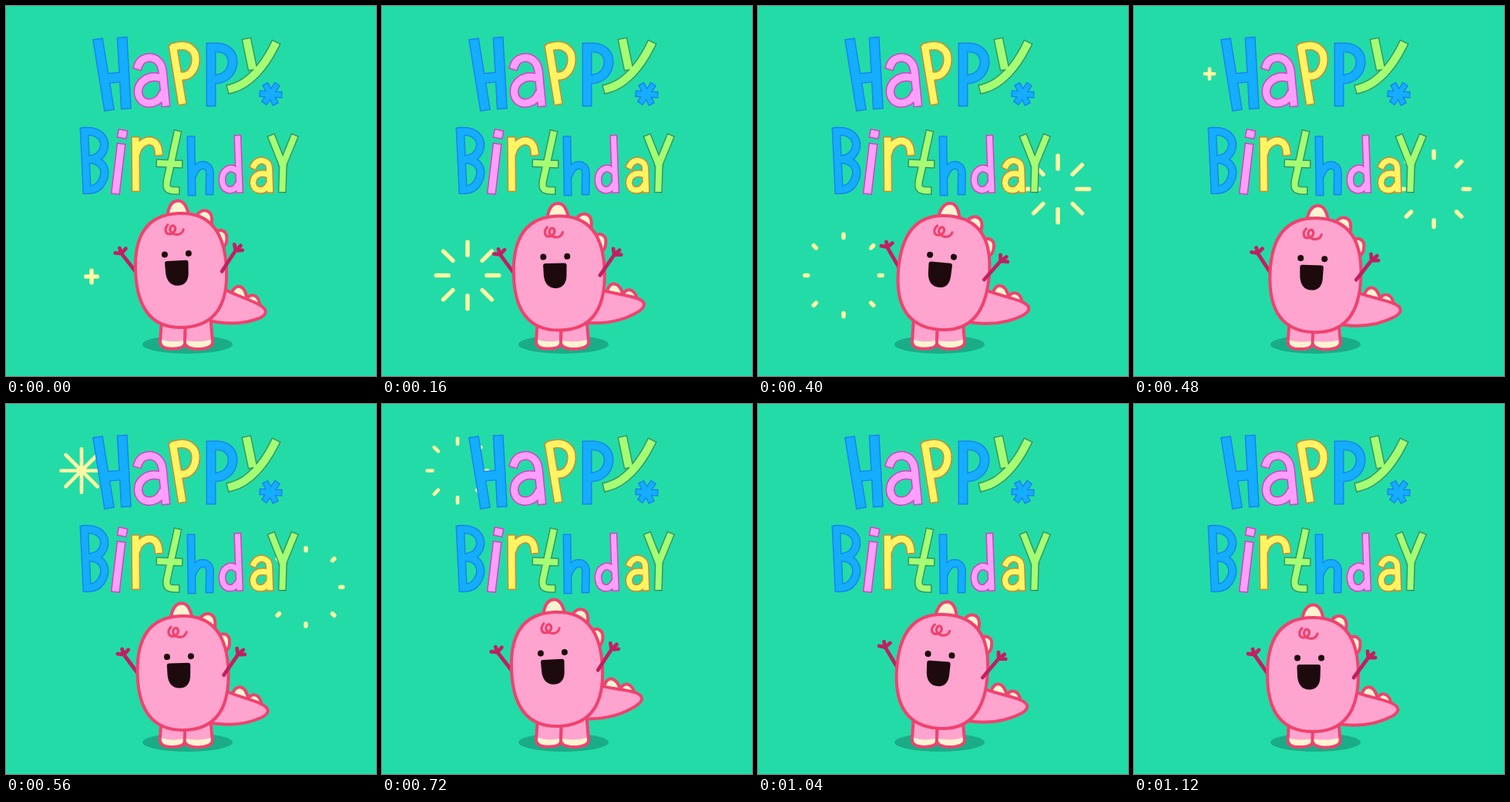
Recreate the animation shown at these times as an HTML page. Size 480x480 px, loop 1200 ms.

```html
<!DOCTYPE html>
<html lang="en">
<head>
<meta charset="utf-8">
<title>Happy Birthday</title>
<style>
html, body { margin: 0; width: 100%; height: 100%; overflow: hidden; background: #23dba7; }
svg { display: block; width: 100vw; height: 100vh; }
.line { fill: none; stroke-linecap: round; stroke-linejoin: round; }
.skin { fill: #ffa3cf; stroke: #f0426e; stroke-width: 4; stroke-linecap: round; stroke-linejoin: round; }
.cream { fill: #fff4d0; stroke: #f0426e; stroke-width: 4; stroke-linejoin: round; }
.sole { fill: #fff4d0; }
.arm { stroke: #c0205f; stroke-width: 4.8; }
.curl { stroke: #f0426e; stroke-width: 3.2; }
.dark { fill: #1c0a0c; }
.spark { stroke: #fdf8a2; }
</style>
</head>
<body>
<svg viewBox="0 0 480 480" role="img" aria-label="Happy Birthday">
  <g id="sparks"></g>
  <g id="letters" fill="none" stroke-linecap="square"></g>
  <ellipse cx="235.5" cy="439" rx="58.5" ry="12" fill="#1aac87"/>
  <g id="tailBase">
    <g id="tail">
      <path class="cream" d="M63 29C65 11 81 12 84 32M83 34C85 22 100 21 102 40"/>
      <path class="skin" d="M42 17C62 28 86 30 102 37C113 42 113 48 103 54C82 65 58 68 32 64"/>
    </g>
  </g>
  <g id="legs">
    <path class="skin" d="M202 405L200 436Q201 444 213 444.500Q231 445 232 438L233 405Z"/>
    <path class="sole" d="M202 433Q215 437 230 434V438Q228 443 213 442.500Q203 442 202 436Z"/>
    <path class="skin" d="M233 405L232 437Q234 445 250 445Q268 444 268 436L265 400Z"/>
    <path class="sole" d="M234 434Q250 437 266 433V436Q266 442 250 443Q236 443 234 437Z"/>
  </g>
  <g id="body">
    <path class="line arm" d="M-57 1L-76 -26M-84 -27L-76 -26L-78 -33M-76 -26L-70 -32"/>
    <path class="cream" d="M-14 -70C-12 -85 -6 -90.500 1 -90.500C8 -90 12 -84 14 -70ZM22 -66C26 -76 35 -79 41 -73C45 -68 44 -60 41 -50ZM49 -48C56 -52 62 -46 61.500 -40C62 -33 59 -28 54 -25Z"/>
    <path class="skin" d="M0 -74C40 -74 59 -49 59 0C59 49 40 74 0 74C-40 74 -59 49 -59 0C-59 -49 -40 -74 0 -74Z"/>
    <path class="line curl" d="M-14 -60C-20 -54 -17 -47 -11 -48C-5 -49 -3 -55 -6 -58C-10 -61 -14 -53 -9 -49C-4 -45 4 -46 6 -53"/>
    <circle class="dark" cx="-20" cy="-21.500" r="4"/>
    <circle class="dark" cx="11" cy="-21.500" r="4"/>
    <path class="dark" d="M-20.500 -10Q-20.500 -13 -17.500 -13L7 -13Q10 -13 10 -10L9.500 4C9 14 4 19.500 -4.500 19.500C-14 19.500 -19 13 -20 3Z"/>
    <path class="line arm" d="M53 4L72 -22M71 -30L72 -22L79 -28M72 -22L81 -22"/>
  </g>
</svg>
<script>
const STEP = 80, FRAMES = 15, SWAY = 7.5;
const el = id => document.getElementById(id);

function path(parent, attrs) {
  const p = document.createElementNS("http://www.w3.org/2000/svg", "path");
  for (const k in attrs) p.setAttribute(k, attrs[k]);
  return parent.appendChild(p);
}

const INK = {
  blue: ["#14adff", "#1785ec"],
  pink: ["#ff9ffc", "#d63fc4"],
  yellow: ["#fff463", "#c98d30"],
  green: ["#a5fd74", "#349860"]
};

// Each letter: ink, pen width, pen strokes.
const LETTERS = [
  ["blue", 13, "M120 49L133 129M151 47L155.500 127M130 94L152 92"],
  ["pink", 11, "M171.500 77C176 63 200 62 203 84L207 125M199 93C184 89 171 99 171.500 112C173 130 195 130 202 116"],
  ["yellow", 11, "M217 55.500L228 122.500M219 53C236 48 247 57 246 71C245 84 237 92 227 91"],
  ["blue", 12, "M266 54V124M268 54C286 52 295 62 294 74C293 88 282 95 270 95"],
  ["green", 12, "M313 48L319 77M348 52C335 78 316 101 293 107"],
  ["blue", 8, "M333 114L354 115M338 104.500L348 124M350 104.500L337 123"],
  ["blue", 10.5, "M101.500 163L105 238M104 162.500C121 162 129 172 127.500 183C125 194 118 198 109 199M109 199C124 200 129 210 127.500 220C124 234 116 238.500 106 238.500"],
  ["pink", 11, "M150.500 166L151.500 166.200M149 184L142.500 238.500"],
  ["yellow", 10.5, "M168 175L168.500 235.500M170 188C174 174 196 167 198 189"],
  ["green", 10, "M222 166.500L209.500 224C206 238 211 239.500 220 239.500M200 204L224 205"],
  ["blue", 10, "M240 174L241 241M243 217C248 203 264 203 264.500 217L264 240"],
  ["pink", 9, "M300.500 172L303 238M298 213C290 207 280.500 214 280.500 225C281 241 294 242 300 233"],
  ["yellow", 9, "M321.500 207C326 197 341 199 341.500 210L342.500 238M338 218C327 215 320.500 221 320.500 230C322 241 334 241 339 234"],
  ["green", 10, "M345.500 172L358.500 205M373 172L359.500 205M359.500 204L358.500 237"]
];

for (const [ink, width, d] of LETTERS) {
  const [fill, edge] = INK[ink];
  path(el("letters"), { d, stroke: edge, "stroke-width": width + 1 });
  path(el("letters"), { d, stroke: fill, "stroke-width": width - 2 });
}

// Bursts: centre, size, first step. Rays run from INNER to OUTER by age.
const BURSTS = [[111, 349.5, 1, 0], [389, 237.5, 1, 3], [98, 86.5, 0.85, 6]];
const INNER = [0, 0, 22, 35.5, 42, 43.5];
const OUTER = [10, 34, 43.5, 49, 50.5, 53];
const STRETCH = [1, 1.09, 1.06, 1.09];
const rays = BURSTS.map(() => path(el("sparks"), { class: "line spark" }));

function drawBurst(ray, [cx, cy, size, start], frame) {
  const age = frame - start;
  if (age < 0 || age > 5) return ray.setAttribute("d", "");
  const pen = 5.5 * size;
  const cap = pen / 2;
  const from = INNER[age] && INNER[age] * size + cap;
  const to = OUTER[age] * size - cap;
  const y0 = cy + (age ? 0 : 1.5);
  const turn = age ? 1 : 2;
  let d = "";
  for (let i = 0; i < 8; i += turn) {
    const a = i * Math.PI / 4, s = STRETCH[i % 4];
    const at = r => `${cx + r * s * Math.cos(a)} ${y0 + r * s * Math.sin(a)}`;
    d += `M${at(from)}L${at(to)}`;
  }
  ray.setAttribute("d", d);
  ray.setAttribute("stroke-width", pen);
}

// Phase, body x, body y, tail angle.
const POSES = [
  [0, 227, 343, 7], [1.5, 227, 344, -6], [3, 237, 353, 5.5], [3.5, 237, 353, 5.5],
  [5, 241, 346, 1], [6.5, 232, 351, 0], [7, 229.5, 349, 3]
];

function pose(i) {
  const n = POSES.length, turn = Math.floor(i / n);
  const [p, ...rest] = POSES[i - turn * n];
  return [p + turn * SWAY, ...rest];
}

// Smooth cyclic curve through the poses.
function poseAt(phase) {
  let i = POSES.length - 1;
  while (POSES[i][0] > phase) i--;
  const [a, b, c, d] = [i - 1, i, i + 1, i + 2].map(pose);
  const span = c[0] - b[0], u = (phase - b[0]) / span;
  return [1, 2, 3].map(k => {
    const m0 = (c[k] - a[k]) / (c[0] - a[0]) * span;
    const m1 = (d[k] - b[k]) / (d[0] - b[0]) * span;
    const e = c[k] - b[k];
    return b[k] + u * (m0 + u * (3 * e - 2 * m0 - m1 + u * (m0 + m1 - 2 * e)));
  });
}

function draw(frame) {
  const [x, y, wag] = poseAt(frame % SWAY);
  const tilt = (x - 232) * 0.6;
  const press = Math.max(0, (y - 346) / 7);
  el("body").setAttribute("transform", `translate(${x} ${y}) rotate(${tilt})`);
  el("tailBase").setAttribute("transform", `translate(${x} ${y})`);
  el("tail").setAttribute("transform", `rotate(${wag} 36 45)`);
  el("legs").setAttribute("transform", `translate(${-press * 0.7} ${press * 0.8})`);
  rays.forEach((ray, i) => drawBurst(ray, BURSTS[i], frame));
}

const begin = performance.now();
function tick(now) {
  draw(Math.floor(Math.max(0, now - begin) / STEP) % FRAMES);
  requestAnimationFrame(tick);
}
draw(0);
requestAnimationFrame(tick);
</script>
</body>
</html>
```
